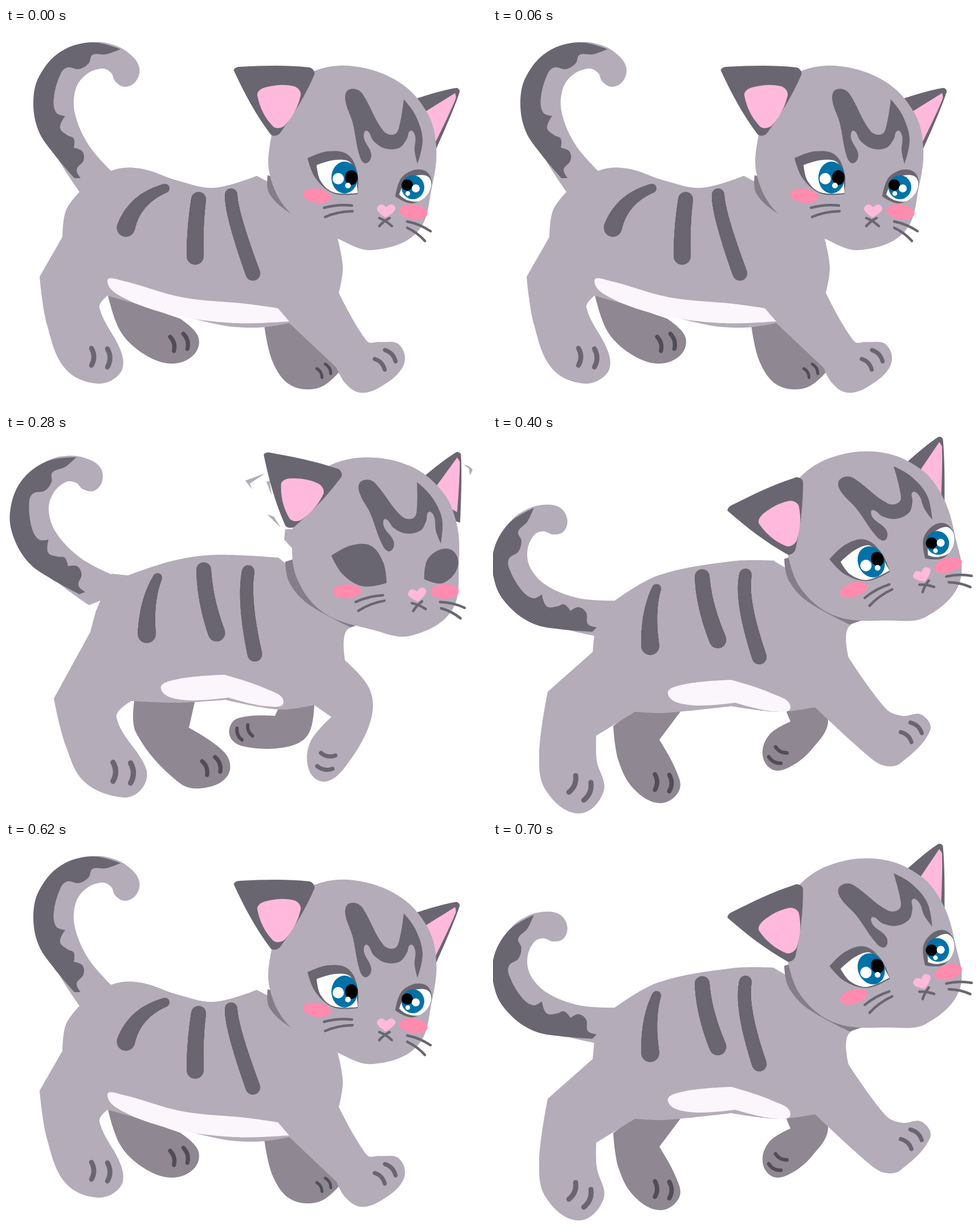
An HTML page with a canvas for the animation above (0.8 s loop, 844 px wide and 664 px high).

```html
<!DOCTYPE html>
<html lang="en">
<head>
<meta charset="utf-8">
<title>Walking kitten</title>
<style>
  html, body { margin: 0; width: 100%; height: 100%; overflow: hidden; background: #fff; }
  canvas { display: block; }
</style>
</head>
<body>
<canvas width="844" height="664"></canvas>
<script>
const ctx = document.querySelector('canvas').getContext('2d');
const FUR = '#b4acb9', DARK = '#6a6671', FAR = '#8f7f92'.replace('7f', '87'), SHADE = '#847d8a',
  BELLY = '#fbf5fc', PINK = '#ffb9dc', CHEEK = '#ff8bae', BLUE = '#0072a8', CLAW = '#504d56';

// Closed smooth outline through "x,y" points; a trailing ! makes a sharp corner.
function blob(color, text) {
  const pts = text.split(' ').map(s => {
    const [x, y] = s.split(',').map(parseFloat);
    return { x, y, corner: s.endsWith('!') };
  });
  const n = pts.length;
  pts.forEach((p, i) => {
    const a = pts[(i + n - 1) % n], b = pts[(i + 1) % n];
    const len = Math.hypot(b.x - a.x, b.y - a.y);
    p.ux = p.corner ? 0 : (b.x - a.x) / len;
    p.uy = p.corner ? 0 : (b.y - a.y) / len;
  });
  ctx.fillStyle = color;
  ctx.beginPath();
  ctx.moveTo(pts[0].x, pts[0].y);
  pts.forEach((p, i) => {
    const q = pts[(i + 1) % n], h = Math.hypot(q.x - p.x, q.y - p.y) * 0.35;
    ctx.bezierCurveTo(p.x + p.ux * h, p.y + p.uy * h, q.x - q.ux * h, q.y - q.uy * h, q.x, q.y);
  });
  ctx.fill();
}

function oval(color, x, y, rx, ry = rx, angle = 0) {
  ctx.fillStyle = color;
  ctx.beginPath();
  ctx.ellipse(x, y, rx, ry, angle, 0, Math.PI * 2);
  ctx.fill();
}

// Slightly bowed round-ended line.
function line(x0, y0, x1, y1, bow = 0.1) {
  ctx.beginPath();
  ctx.moveTo(x0, y0);
  ctx.quadraticCurveTo((x0 + x1) / 2 + (y1 - y0) * bow, (y0 + y1) / 2 - (x1 - x0) * bow, x1, y1);
  ctx.stroke();
}

function pen(color, width) {
  ctx.strokeStyle = color;
  ctx.lineWidth = width;
  ctx.lineCap = 'round';
}

// Thick curve whose radius grows from r0 to r1.
function stripe(r0, r1, x0, y0, cx, cy, x1, y1) {
  for (let t = 0; t <= 1; t += 0.01) {
    const u = 1 - t;
    const mix = (a, b, c) => u * u * a + 2 * u * t * b + t * t * c;
    oval(DARK, mix(x0, cx, x1), mix(y0, cy, y1), r0 + (r1 - r0) * t);
  }
}

// Draws a part with its anchor (ax, ay) moved to (x, y) and turned.
function place(part, ax, ay, x, y, degrees) {
  ctx.save();
  ctx.translate(x, y);
  ctx.rotate(degrees * Math.PI / 180);
  ctx.translate(-ax, -ay);
  part();
  ctx.restore();
}

function toes(color, x, y, degrees, size) {
  place(() => {
    ctx.scale(size, size);
    pen(color, 8.5);
    line(-2, -15, -2, 15, 0.28);
    line(26, -14, 26, 18, 0.28);
  }, 0, 0, x, y, degrees);
}

function tailFur() {
  blob(FUR, '185,251! 145,205 121,150 122,108 140,82 168,71 184,78 192,94 209,103 228,93 234,70 220,48 190,30 150,27 60,85 70,185 129,287! 215,285!');
}

function tailMark() {
  blob(DARK, '201,37! 150,25 95,42 58,85 48,130 57,180 85,222 120,263! 131,263! 124,248 136,232 134,216 119,210! 119,194 108,188 95,175 104,154! 88,148 84,122 96,80 108,69 128,72 145,62 152,47 176,46');
}

function farEar() {
  blob(DARK, '722,123! 790,105 796,112 757,207! 750,222! 715,190!');
  blob(PINK, '735,147! 788,114! 789,124 752,203! 735,180!');
}

function nearEar() {
  blob(DARK, '400,75 409,68 532,69 541,82 481,184 464,186');
  blob(PINK, '441,118 455,104 505,102 517,118 490,170 468,172');
}

function eyes() {
  blob('#fff', '545,240! 580,231 606,238 617,289! 575,288 552,268');
  oval(BLUE, 594, 262, 23, 28);
  oval('#000', 606, 262, 11, 13);
  oval('#fff', 583, 264, 10);
  oval('#fff', 600, 276, 5);
  blob('#fff', '690,292! 705,265 738,259 746,278 728,302 705,302');
  oval(BLUE, 714, 279, 20, 21);
  oval('#000', 704, 275, 10);
  oval('#fff', 719, 281, 7);
  oval('#fff', 705, 290, 4);
}

function head(open) {
  blob(FUR, '466,188 490,115 539,76 610,67 690,95 740,150 755,210 748,275 722,357 643,389 582,369 500,325 463,258');
  blob(DARK, '596,130 598,111 613,107 626,116 662,180 682,186 691,168 698,125! 718,152 731,195 722,238! 717,215 718,190 710,180 703,195 690,210 665,211 645,198 633,180 628,192 641,222 632,237 621,226 608,165');
  blob(DARK, '529,228! 565,216 600,222 617,255 617,291! 575,290 543,263');
  blob(DARK, '683,295! 697,259 735,250 746,280 715,307');
  oval(CHEEK, 546, 294, 25, 12.5, 0.14);
  oval(CHEEK, 715, 322, 25, 13, 0.14);
  pen(DARK, 4.5);
  line(655, 333, 677, 347);
  line(655, 347, 673, 333);
  line(558, 315, 607, 311);
  line(560, 331, 608, 321);
  line(704, 339, 745, 356);
  line(704, 350, 735, 373);
  blob(PINK, '666,332! 651,318 658,309 667,314! 677,309 683,318');
  if (open) eyes();
}

function neck() {
  blob(SHADE, '490,222! 497,258 530,296 605,337! 626,330! 560,270! 512,215!');
}

function belly() {
  blob(BELLY, '272,445 300,428 383,420! 455,444 487,468 455,475 390,460! 310,464');
}

function stand() {
  tailFur();
  blob(FAR, '178,465! 200,530 240,570 290,588 330,572 337,540 305,509!');
  blob(FAR, '453,520! 468,585 500,626 550,630 587,600! 540,550! 497,512!');
  blob(FUR, '185,250 235,246 300,267 365,280 440,259! 480,280! 582,369! 591,420 584,464! 634,549 655,550 690,555 698,590 660,627 622,639 595,622 580,595! 497,517! 440,525 370,519 178,469! 164,490 203,570 200,605 160,623 104,597 72,520 59,436! 99,366! 105,320 129,287!');
  tailMark();
  blob(BELLY, '178,443 205,443 310,472 420,483 477,491! 497,514! 400,517 290,502 205,472');
  stripe(8, 16, 279, 281, 225, 300, 210, 351);
  stripe(13, 15, 338, 300, 331, 350, 332, 401);
  stripe(11, 13, 395, 292, 395, 325, 434, 432);
  blob(SHADE, '459,258! 462,290 500,325 563,352! 530,310! 475,262!');
  toes(DARK, 152, 576, 0, 1);
  toes(DARK, 657, 588, -43, 0.85);
  toes(CLAW, 293, 553, -15, 0.85);
  toes(CLAW, 551, 604, -30, 0.6);
  farEar();
  head(true);
  nearEar();
}

function blink() {
  place(tailFur, 131, 263, 139, 275, -21);
  blob(FAR, '226,460! 228,521 305,610 350,618 390,595 385,558 321,513! 333,460!');
  blob(FAR, '541,470! 530,525 490,547 415,545 392,525 405,497 472,492! 480,475!');
  blob(FUR, '185,243! 214,246! 290,221 365,210 478,215! 625,330! 596,345 595,395! 638,445 640,500 600,575 562,607 533,590 533,540 571,494! 541,473! 480,481 385,464! 300,469 220,466! 194,495 246,585 238,620 205,635 138,608 105,545 84,462! 148,345! 157,311!');
  place(tailMark, 131, 263, 139, 275, -21);
  belly();
  stripe(8, 16, 266, 250, 246, 290, 247, 350);
  stripe(13, 15, 347, 236, 349, 290, 370, 348);
  stripe(11, 13, 425, 239, 416, 290, 437, 386);
  neck();
  // Loose wisps of fur around the ears.
  blob(FUR, '420,80! 455,67! 428,85! 432,95!');
  blob(FUR, '457,82! 466,106! 463,80!');
  blob(FUR, '458,139! 482,162! 470,143!');
  blob(FUR, '804,52 818,60 814,70! 812,58!');
  blob(FUR, '490,165! 510,165! 505,202! 488,183!');
  toes(DARK, 190, 590, 0, 1.1);
  toes(DARK, 565, 561, 100, 0.85);
  toes(CLAW, 350, 583, -20, 0.85);
  toes(CLAW, 427, 518, 157, 0.7);
  place(farEar, 796, 106, 796, 29, -22);
  place(head, 666, 320, 721, 280, -9.3);
  place(nearEar, 402, 72, 455, 33, 13);
}

function stride() {
  place(tailFur, 131, 263, 182, 337, -45);
  blob(FAR, '255,475! 211,510! 220,570 247,620 293,645 327,622 320,585 292,534! 340,470!');
  blob(FAR, '560,470! 588,500 560,550 520,582 490,586 473,560 485,525 522,502! 512,478!');
  blob(FUR, '214,290! 290,246 420,221 492,220! 655,318! 622,340 624,390! 690,480 718,492 752,490 767,518 715,575 690,580 664,567 565,477! 500,485 418,475! 300,487 249,485! 181,527! 182,570 194,625 150,663 93,623 81,560 96,450! 175,380! 178,347!');
  place(tailMark, 131, 263, 182, 337, -45);
  place(belly, 0, 0, 35, 9, 0);
  stripe(8, 16, 287, 269, 271, 310, 276, 371);
  stripe(13, 15, 367, 248, 370, 300, 395, 360);
  stripe(11, 13, 443, 245, 434, 290, 468, 391);
  place(neck, 0, 0, 21, -5, 0);
  toes(DARK, 141, 612, 22, 1.05);
  toes(DARK, 726, 528, -47, 0.85);
  toes(CLAW, 286, 608, 0, 0.9);
  toes(CLAW, 505, 553, 118, 0.75);
  place(farEar, 796, 106, 787, 2, -24);
  place(() => head(true), 666, 320, 753, 246, -24);
  place(nearEar, 402, 72, 413, 130, -24);
}

const steps = [[100, stand], [400, blink], [500, stride], [700, stand], [800, stride]];

function draw() {
  const time = performance.now() % 800;
  ctx.clearRect(0, 0, 844, 664);
  steps.find(([end]) => time < end)[1]();
  requestAnimationFrame(draw);
}
draw();
</script>
</body>
</html>
```
